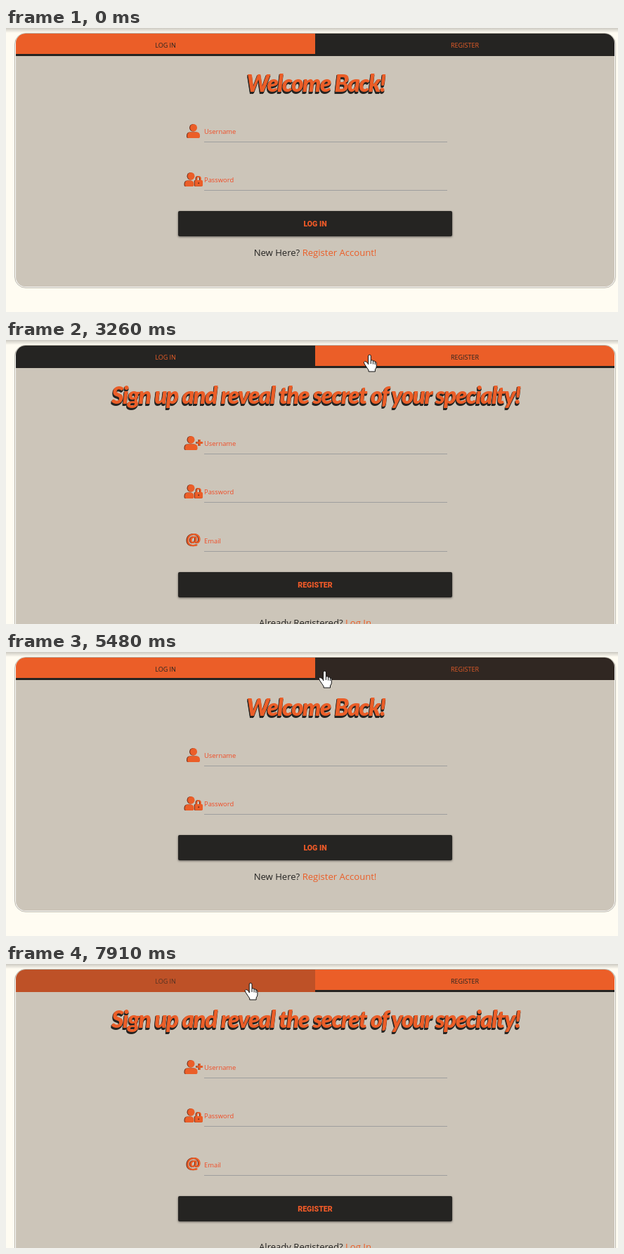
An HTML page that plays this animation: 871 by 405 pixels, repeating every 7990 ms.

```html
<!DOCTYPE html>
<html lang="en">
<head>
<meta charset="utf-8">
<title>Log in or register</title>
<style>
  html, body { margin: 0; width: 100%; height: 100%; overflow: hidden; background: #fffcf2; }
  svg { display: block; width: 100vw; height: 100vh; }
  text { font-family: "Open Sans", "Noto Sans", sans-serif; text-anchor: middle; fill: #252422; }
  .accent { fill: #eb5e28; }
  .tab { font-size: 9px; }
  .label { font-size: 9.4px; font-weight: 500; text-anchor: start; fill: #f04c26; }
  .note { font-size: 13.1px; }
  .button { font: 900 10.6px Roboto, sans-serif; fill: #f05a28; }
  .title {
    font: italic 900 33px Lato, cursive; letter-spacing: -1.5px; word-spacing: .6px; fill: #eb5e28;
    filter: drop-shadow(-1px 1px 0 #252422) drop-shadow(0 2px .5px #252422);
  }
  .icon { fill: #eb5e28; filter: drop-shadow(-.4px .8px 0 #6b2a18); }
  .at { font-size: 24px; font-weight: 700; fill: #eb5e28; }
  .raised { filter: drop-shadow(0 1px 1.5px #0008); }
</style>
</head>
<body>
<svg viewBox="0 0 871 405">
  <defs>
    <linearGradient id="topShade" x2="0" y2="1">
      <stop stop-opacity=".2"/><stop offset="1" stop-opacity="0"/>
    </linearGradient>
    <clipPath id="cardClip"><rect x="14" y="8" width="852" height="500" rx="14"/></clipPath>
  </defs>
  <rect width="871" height="405" fill="#fffcf2"/>
  <rect width="871" height="7" fill="url(#topShade)"/>
  <g id="login"></g>
  <g id="register"></g>
  <g clip-path="url(#cardClip)">
    <rect id="leftTab" x="14" y="8" width="426" height="32"/>
    <rect id="rightTab" x="440" y="8" width="426" height="32"/>
    <rect id="indicator" y="37" height="3" fill="#252422"/>
  </g>
  <text id="leftText" class="tab" x="227" y="28">LOG IN</text>
  <text id="rightText" class="tab" x="653" y="28">REGISTER</text>
  <g id="cursor">
    <path d="M-1.5 14V2a1.9 1.9 0 0 1 3.8 0V8q2.6-1 3.1 1q2.4-.8 2.8 1q2-.2 2 2V17q0 2-1.8 4V24H-1V22q-2-3-6-9q-1.5-3 .5-3.5Q-4 9-1.5 13z"
      fill="#fff" stroke="#111" stroke-linejoin="round"/>
    <path d="M2.3 8v5M5.4 9v4.5M8.2 10v4" stroke="#111" fill="none"/>
    <circle id="press" cx="-1" r="12" fill="#f9e30a" opacity=".55"/>
  </g>
</svg>
<script>
const LOOP = 7990;
const DARK = [37, 36, 34], ORANGE = [235, 94, 40];
const TO_REGISTER = 2870, TO_LOGIN = 4930, TO_REGISTER_AGAIN = 7050;
const $ = id => document.getElementById(id);

// ---------- static views ----------
const person = (x, y, left = x - 9, right = x + 9) =>
  `<ellipse cx="${x}" cy="${y - 4.8}" rx="5" ry="5.3"/>
   <path d="M${left} ${y + 8}v-1.5q0-5 5-5H${right - 5}q5 0 5 5v1.5q0 2-2 2H${left + 2}q-2 0-2-2z"/>`;
const icons = {
  user: y => person(267, y),
  plus: y => person(263.5, y, 254.5, 272.5) +
    `<path d="M274.5 ${y - 5}h2.4v3.3h3.3v2.4h-3.3v3.3h-2.4v-3.3h-3.3v-2.4h3.3z"/>`,
  lock: y => person(263.5, y, 254.5, 267.3) +
    `<path d="M271.5 ${y + 2}v-3.5a2.7 2.7 0 0 1 5.4 0v3.5" fill="none" stroke="#eb5e28" stroke-width="1.8"/>
     <rect x="268.7" y="${y + 1}" width="11.3" height="8.8" rx="1.5"/>
     <circle cx="274.2" cy="${y + 5.3}" r="1" fill="#6b2a18"/>`,
  at: y => `<text class="at" x="267" y="${y + 6.5}">@</text>`
};
const field = (icon, label, y) =>
  `<g class="icon">${icons[icon](y)}</g>
   <text class="label" x="282" y="${y + 4}">${label}</text>
   <path d="M282 ${y + 15.5}h346" stroke="#9e9e9e"/>`;

function view({ height, title, fields, action, note, link, noteY }) {
  const buttonY = Math.round(122 + fields.length * 69.6);
  return `<rect x="12.5" y="7.5" width="855" height="${height + 2}" rx="15.5" fill="#fff" stroke="#b9b5aa"/>
    <rect x="14" y="8" width="852" height="${height}" rx="14" fill="#ccc5b9"/>
    <text class="title" x="441" y="91">${title}</text>
    ${fields.map(([icon, label], i) => field(icon, label, 147 + Math.round(i * 69.4))).join("")}
    <rect class="raised" x="245" y="${buttonY}" width="390" height="36" rx="2" fill="#252422"/>
    <text class="button" x="440" y="${buttonY + 21.5}">${action}</text>
    <text class="note" x="440" y="${noteY}">${note} <tspan class="accent">${link}</tspan></text>`;
}

$("login").innerHTML = view({
  height: 361, title: "Welcome Back!", action: "LOG IN",
  fields: [["user", "Username"], ["lock", "Password"]],
  note: "New Here?", link: "Register Account!", noteY: 325
});
$("register").innerHTML = view({
  height: 450, title: "Sign up and reveal the secret of your specialty!", action: "REGISTER",
  fields: [["plus", "Username"], ["lock", "Password"], ["at", "Email"]],
  note: "Already Registered?", link: "Log In", noteY: 407.5
});

// ---------- motion ----------
// Pointer tip: time, x, y
const route = [
  [1390, 37, 18], [1560, 80, 12], [1950, 360, 15], [2170, 436, 34], [2250, 472, 28],
  [2320, 513, 21], [2470, 517, 21], [4230, 517, 21], [4345, 440, 30], [4520, 422, 32],
  [4760, 402, 27], [5380, 402, 27], [5480, 453, 27], [5710, 478, 27], [7690, 478, 27],
  [7910, 348, 27], [LOOP, 325, 27]
];
const presses = [[2850, 3010], [4920, 5070], [6900, 7090]];

function tween(t, start, duration = 280) {
  const x = Math.min(1, Math.max(0, (t - start) / duration));
  return 1 - (1 - x) ** 2;
}
const mix = k => `rgb(${DARK.map((d, i) => Math.round(d + (ORANGE[i] - d) * k))})`;

function pointerAt(t) {
  const i = Math.max(1, route.findIndex(p => p[0] >= t));
  const [t0, x0, y0] = route[i - 1], [t1, x1, y1] = route[i];
  const k = (t - t0) / (t1 - t0);
  return [x0 + (x1 - x0) * k, y0 + (y1 - y0) * k];
}

// The edge leading the slide starts at once, the other one 90 ms later.
function indicatorEdge(t, delayRight, delayLeft) {
  return tween(t, TO_REGISTER + delayRight, 300)
    - tween(t, TO_LOGIN + delayLeft, 300)
    + tween(t, TO_REGISTER_AGAIN + delayRight, 300);
}

function paintTab(side, k) {
  $(side + "Tab").style.fill = mix(k);
  $(side + "Text").style.fill = mix(1 - k);
}

function draw(t) {
  paintTab("left", 1 - tween(t, TO_REGISTER) + tween(t, 4345) - tween(t, TO_REGISTER_AGAIN) + tween(t, 7764));
  paintTab("right", tween(t, 2196) - tween(t, TO_LOGIN) + tween(t, 5473));

  $("register").style.opacity =
    tween(t, TO_REGISTER, 200) - tween(t, TO_LOGIN, 200) + tween(t, TO_REGISTER_AGAIN, 200);

  const left = 14 + 426 * indicatorEdge(t, 90, 0);
  const right = 440 + 426 * indicatorEdge(t, 0, 90);
  $("indicator").setAttribute("x", left);
  $("indicator").setAttribute("width", right - left);

  const visible = t >= route[0][0];
  $("cursor").style.display = visible ? "" : "none";
  if (visible) $("cursor").setAttribute("transform", `translate(${pointerAt(t)})`);
  $("press").style.display = presses.some(([from, to]) => t >= from && t < to) ? "" : "none";
}

const begin = performance.now();
function frame() {
  draw((performance.now() - begin) % LOOP);
  requestAnimationFrame(frame);
}
frame();
</script>
</body>
</html>
```
